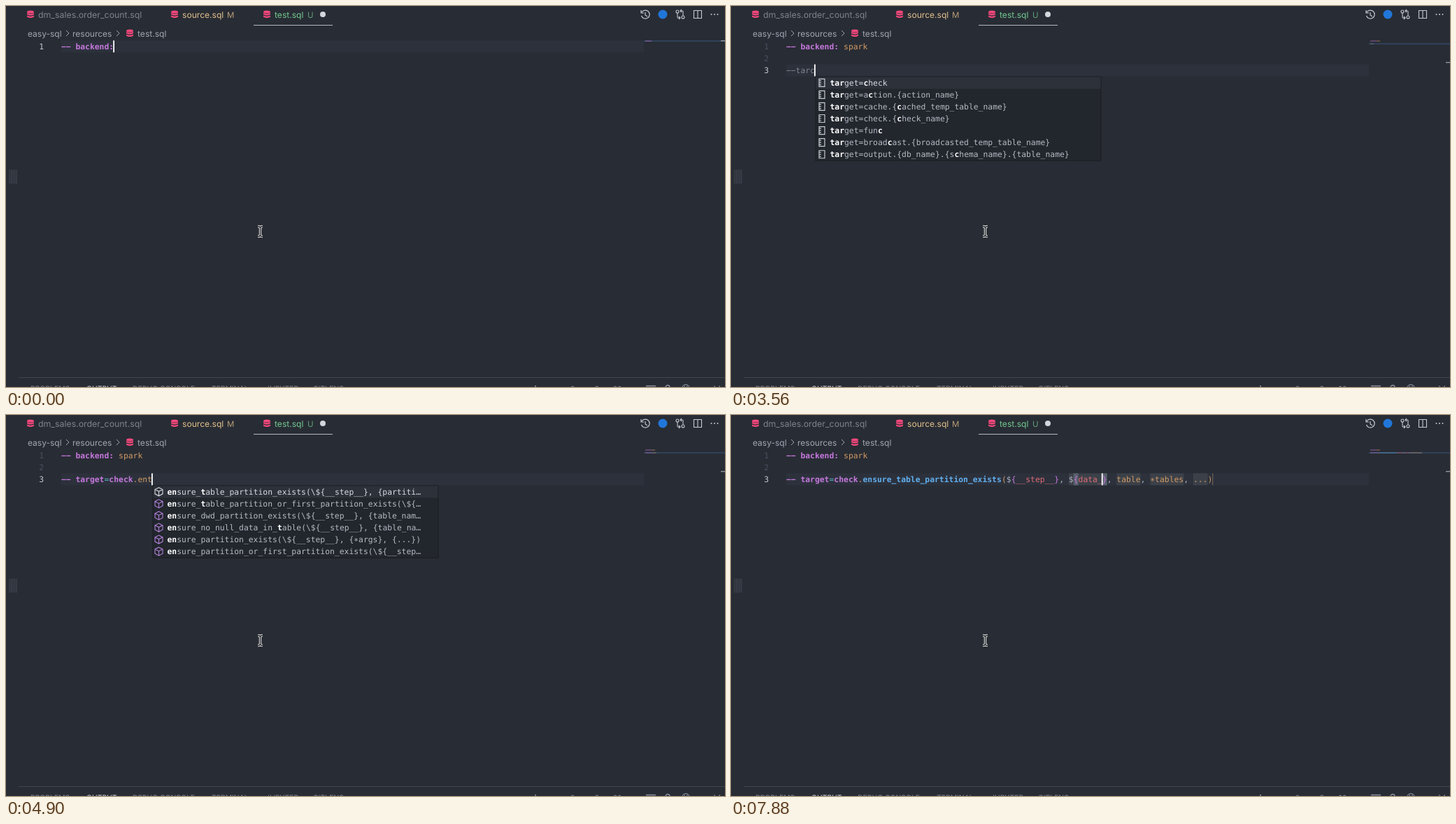
Recreate the animation shown at these times as an HTML page with a canvas. Size 1028 px wide and 545 px high, loop 8000 ms.

```html
<!DOCTYPE html>
<html>
<head>
<meta charset="utf-8">
<style>
  html, body { margin: 0; width: 100%; height: 100%; overflow: hidden; background: #282c34; }
  canvas { display: block; }
</style>
</head>
<body>
<canvas id="stage" width="1028" height="545"></canvas>
<script>
const ctx = document.getElementById('stage').getContext('2d');
const LOOP = 8000, LEFT = 78.9, CHAR = 6.847, ROW = 17.07, TOP = 49.3;
const MONO = '11.37px "DejaVu Sans Mono", monospace', UI = 'Inter, sans-serif';
const FG = '#abb2bf', PURPLE = '#c678dd', PINK = '#f7487d';

// Token styles: [colour, bold]
const STYLE = {
  k: [PURPLE, 1], s: ['#d19a66'], g: ['#7f848e'], f: ['#61afef', 1],
  v: ['#e06c75'], w: [FG], b: [PURPLE], c: ['#56b6c2']
};

// Suggestions; matched letters stand between tildes.
const BACKENDS = ['bigquery', 'clickhouse', 'maxcompute', 'postgres', 'spark'];
const TARGETS = ['action.{action_name}', 'broadcast.{broadcasted_temp_table_name}',
  'cache.{cached_temp_table_name}', 'check', 'check.{check_name}', 'func', 'list_variables',
  'log.{log_name}', 'output.{db_name}.{schema_name}.{table_name}', 'output.{db_name}.{table_name}',
  'temp.{temp_table_name}', 'template.{template_name}'];
const ALL = ['backend:', 'include={file_path}', 'inputs: {*input_table_name}, {...}',
  'outputs: {*input_table_name}, {...}', 'prepare-sql: {sql_expression}',
  ...TARGETS.slice(0, 7).map(t => 'target=' + t)];
const TARC = ['~c~heck', 'a~c~tion.{action_name}', 'cache.{~c~ached_temp_table_name}',
  'check.{~c~heck_name}', 'fun~c~', 'broad~c~ast.{broadcasted_temp_table_name}',
  'output.{db_name}.{s~c~hema_name}.{table_name}'].map(t => '~tar~get=' + t);
const CHECKS = ['~en~sure_dwd_partition_exists(\\${__step__}, {table_nam…',
  '~en~sure_no_null_data_in_table(\\${__step__}, {table_na…',
  '~en~sure_partition_exists(\\${__step__}, {*args}, {...})',
  '~en~sure_partition_or_first_partition_exists(\\${__step…',
  '~en~sure_table_partition_exists(\\${__step__}, {partiti…',
  '~en~sure_table_partition_or_first_partition_exists(\\${…',
  '~en~umerate({iterable}, {start})', '~e~qual_ig~n~ore_case({a}, {b})',
  'partition_~e~xists({table_~n~ame}, {partition_value})',
  'partition_not_~e~xists({table_~n~ame}, {partition_value})',
  'alert_~e~xception_handler({rule_~n~ame}, {mentioned_user…',
  'previous_partition_~e~xists({table_~n~ame}, {curr_partit…'];
const PLAIN = CHECKS.map(t => t.replaceAll('~', ''));
const ENT = [4, 5, 0, 1, 2, 3].map(i => CHECKS[i].replace(/_t/, '_~t~'));

const popup = (items, thumb = 0, extra = {}) => ({ items, thumb, ...extra });
const CUBE = { cube: true };
const targets = typed => popup(TARGETS.map(t => `~${typed}~${'target'.slice(typed.length)}=${t}`), 167);
const first = [['k', '-- backend:']];
const firstDone = [...first, ['s', ' spark']];
const check = rest => [['k', '-- target'], ['c', '='], ['k', 'check'], ['s', rest]];

// Function call whose second argument is being edited.
function call(arg, caret, selected) {
  const size = arg.reduce((n, a) => n + a[1].length, 0);
  const at = 59 + size;
  return {
    code: [...check('.'), ['f', 'ensure_table_partition_exists'], ['s', '('], ['w', '$'], ['b', '{'],
      ['v', '__step__'], ['b', '}'], ['w', ', '], ...arg, ['w', ', '], ['s', 'table'], ['w', ', '],
      ['s', '*tables'], ['w', ', '], ['s', '...)']],
    stops: [[59, size], [at + 2, 5], [at + 9, 7], [at + 18, 3]],
    caret, selected, end: at + 22, braces: size > 1 && !selected && [60, at - 1]
  };
}
const variable = name => call([['w', '$'], ['b', '{'], ['v', name], ['b', '}']], 61 + name.length);
const pending = call([['s', 'partition_value']], 74, true);

// Each state: start time, active line, its contents and the suggestion list.
const states = [];
const add = (t, line, content, list) => states.push({
  t, line, list, ...(Array.isArray(content) ? { code: content } : content)
});
add(0, 1, first);
add(140, 1, [...first, ['s', ' ']], popup(BACKENDS));
add(290, 1, [...first, ['s', ' sp']], popup(['~sp~ark']));
add(590, 1, firstDone);
add(880, 2, []);
add(1030, 3, []);
add(1630, 3, [['g', '-']], popup(ALL, 139, { details: true }));
add(1780, 3, [['g', '--']], popup(ALL, 139));
add(2230, 3, { code: [['g', '--']], hidden: true }, popup(ALL));
add(2670, 3, [['g', '--']], popup(ALL));
add(3110, 3, [['g', '--ta']], targets('ta'));
add(3260, 3, [['g', '--tar']], targets('tar'));
add(3560, 3, [['g', '--tarc']], popup(TARC));
add(4010, 3, check(''));
add(4310, 3, check('.'), popup(PLAIN, 90, CUBE));
add(4450, 3, check('.e'), popup(PLAIN.map(t => t.replace('e', '~e~')), 120, CUBE));
add(4600, 3, check('.en'), popup(CHECKS, 156, CUBE));
add(4750, 3, check('.ent'), popup(ENT, 0, CUBE));
add(5350, 3, pending);
add(5940, 3, { ...pending, hidden: true });
add(6390, 3, call([['w', '$']], 60));
add(6540, 3, variable(''));
add(6990, 3, variable('d'));
add(7140, 3, variable('dat'));
add(7290, 3, variable('data'));
add(7740, 3, variable('data_'));

const colX = col => LEFT + col * CHAR;
const rowY = line => TOP + (line - 1) * ROW;

function rect(x, y, w, h, color) {
  ctx.fillStyle = color;
  ctx.fillRect(x, y, w, h);
}
function text(str, x, y, color, font) {
  ctx.font = font;
  ctx.fillStyle = color;
  ctx.fillText(str, x, y);
}
const label = (str, x, y, color, size = 12) => text(str, x, y, color, `${size}px ${UI}`);

// Code uses wide dashes and vertically centred asterisks.
function mono(str, x, y, color, bold) {
  const glyphs = String(str).replaceAll('-', '\u2212').replaceAll('*', '\u2217');
  text(glyphs, x, y, color, (bold ? 'bold ' : '') + MONO);
}

function path(d, color, x = 0, y = 0, width = 1) {
  ctx.save();
  ctx.translate(x, y);
  ctx.strokeStyle = color;
  ctx.lineWidth = width;
  ctx.stroke(new Path2D(d));
  ctx.restore();
}
function disc(x, y, r, color) {
  ctx.fillStyle = color;
  ctx.beginPath();
  ctx.arc(x, y, r, 0, 7);
  ctx.fill();
}
function database(x, y) {
  ctx.fillStyle = PINK;
  ctx.fill(new Path2D(`M${x - 5} ${y - 3.6}a5 2 0 0 1 10 0a5 2 0 0 1 -10 0`));
  for (const dy of [-2, 1.5])
    ctx.fill(new Path2D(`M${x - 5} ${y + dy}q5 2.4 10 0v2q-5 3 -10 0z`));
}

function drawTop() {
  database(35, 12);
  label('dm_sales.order_count.sql', 46, 16.5, '#7d828c', 12.35);
  database(241, 12);
  label('source.sql', 252, 16.5, '#e2c08d', 12.1);
  label('M', 316, 16.5, '#b79d78', 11.5);
  database(373, 12);
  label('test.sql', 384, 16.5, '#73c991', 12.1);
  label('U', 431, 16.5, '#5fa37a', 11.5);
  disc(453, 12, 4, '#d3d6db');
  rect(354, 27, 113, 1, '#b4b8bf');

  label('easy-sql', 31, 43.5, '#a0a6b1');
  label('resources', 95, 43.5, '#a0a6b1');
  label('test.sql', 188, 43.5, '#a0a6b1', 12.1);
  for (const x of [86, 158]) path('M0 -4l4 4l-4 4', '#a0a6b1', x, 39);
  database(177, 39);

  const icon = '#c5c9d0';
  path('M-5 -3a6 6 0 1 1 -.5 5M-6 -6v4h4M0 -3v4l3 2', icon, 914, 12, 1.2);
  disc(939, 12, 6.5, '#2176d9');
  path('M-4 -2v6q0 1 1 1h3M-2 3l2 2l-2 2M4 2v-6q0 -1 -1 -1h-3M2 -7l-2 2l2 2' +
    'M-6 -4a2 2 0 1 1 4 0a2 2 0 1 1 -4 0M2 4a2 2 0 1 1 4 0a2 2 0 1 1 -4 0', icon, 964, 12, 1.1);
  path('M-5.5 -5.5h11v11h-11zM0 -5.5v11', icon, 989, 12, 1.1);
  for (const x of [1008.5, 1013, 1017.5]) disc(x, 12, 1, icon);
}

function drawFrame() {
  for (let x = 4.5; x < 15; x += 2.5) rect(x, 234, 1.3, 20, '#3e444e');
  rect(18, 531, 1010, 1, '#414650');
  const tabs = { PROBLEMS: 35, OUTPUT: 115, 'DEBUG CONSOLE': 181, TERMINAL: 294, JUPYTER: 371, GITLENS: 439 };
  for (const name in tabs)
    label(name, tabs[name], 551, name === 'OUTPUT' ? '#d7dae0' : '#858b96', 10.4);
  const dim = '#9097a2';
  rect(756, 543, 2, 1.5, dim);
  label('2', 807, 551, dim, 10);
  label('5', 842, 551, dim, 10);
  label('20', 868, 551, dim, 10);
  path('M0 0h14', dim, 915, 543.5, 1.4);
  path('M-3 3a3 3 0 0 1 6 0', dim, 946, 542.5, 1.3);
  path('M-5 3a5 4 0 0 1 10 0M-2 0v3M2 0v3', dim, 972, 542.5);
  path('M0 0l3 3M9 0l-3 3', dim, 1012, 543);

  const beam = 'M-3.5 -7h1.5q2 0 2 2v10q0 2 -2 2h-1.5M3.5 -7h-1.5q-2 0 -2 2M3.5 7h-1.5q-2 0 -2 -2';
  path(beam, '#f0f0f0', 363.5, 322.5, 3.4);
  path(beam, '#15171b', 363.5, 322.5, 1.3);
}

function drawCode(tokens, line) {
  let col = 0;
  const y = rowY(line);
  for (const [kind, str] of tokens) {
    const [color, bold] = STYLE[kind];
    mono(str, colX(col), y + 12.3, color, bold);
    ctx.globalAlpha = 0.55;
    if (str.trim()) rect(914 + col * 0.83, 47.5 + line * 2, str.length * 0.83, 1.2, color);
    ctx.globalAlpha = 1;
    col += str.length;
  }
  return col;
}

function drawPopup({ items, thumb, cube, details }, x, y) {
  const width = 409, height = items.length * ROW + 2;
  if (details) rect(x + width - 7, y + 18, 195, 92, '#2c3139');
  rect(x, y, width, height, '#1b1e23');
  rect(x + 1, y + 1, width - 2, height - 2, '#22262d');
  rect(x + 1, y + 1, width - 2, ROW, '#2c313a');
  if (thumb) rect(x + width - 9, y + 1, 8, thumb, '#353a43');
  items.forEach((item, i) => {
    const mid = y + 9.3 + i * ROW;
    const color = i ? '#b5bac4' : '#d7dae0';
    if (cube)
      path('M0 -6l5.5 2.8v6.2l-5.5 3l-5.5 -3v-6.2zM-5.5 -3.2l5.5 2.7l5.5 -2.7M0 -.5v6.5',
        i ? '#b180d7' : '#d7dae0', x + 9, mid, 1.1);
    else
      path('M-4 -5.5h8v11h-8zM-4 -3h3M-4 0h3M-4 3h3', '#c8ccd3', x + 9.5, mid, 1.2);
    let at = x + 21;
    item.split('~').forEach((part, n) => {
      mono(part, at, mid + 3.7, n % 2 ? '#ffffff' : color, n % 2);
      at += part.length * CHAR;
    });
  });
}

function drawEditor(s) {
  const y = rowY(s.line);
  rect(79, y, 833, ROW, '#2c313c');
  rect(912, 47.5 + s.line * 2, 116, 1.2, '#35506f');
  rect(1022, s.line === 1 ? 49 : 80, 6, 1.5, '#8b919b');

  (s.stops || []).forEach(([col, size], i) =>
    rect(colX(col), y, size * CHAR, ROW, i === 0 && s.selected ? '#596273' : '#3c4149'));
  for (const col of s.braces || []) rect(colX(col), y, CHAR, ROW, '#59606c');

  for (let n = 1; n <= s.line; n++)
    mono(n, 47.3, rowY(n) + 12.3, n === s.line ? '#c3c8d0' : '#495162');
  if (s.line > 1) drawCode(firstDone, 1);
  const length = drawCode(s.code, s.line);
  if (s.end) rect(colX(s.end), y, 1, ROW, '#7b6a59');

  const x = colX(s.caret ?? length);
  if (!s.hidden) rect(x - 1, y, 1.8, ROW, '#ffffff');
  if (s.list) drawPopup(s.list, x + 0.5, y + ROW);
}

function draw(now) {
  const time = now % LOOP;
  ctx.textRendering = 'geometricPrecision';
  rect(0, 0, 1028, 545, '#282c34');
  drawTop();
  drawEditor(states.findLast(s => s.t <= time));
  drawFrame();
  requestAnimationFrame(draw);
}
draw(0);
</script>
</body>
</html>
```
